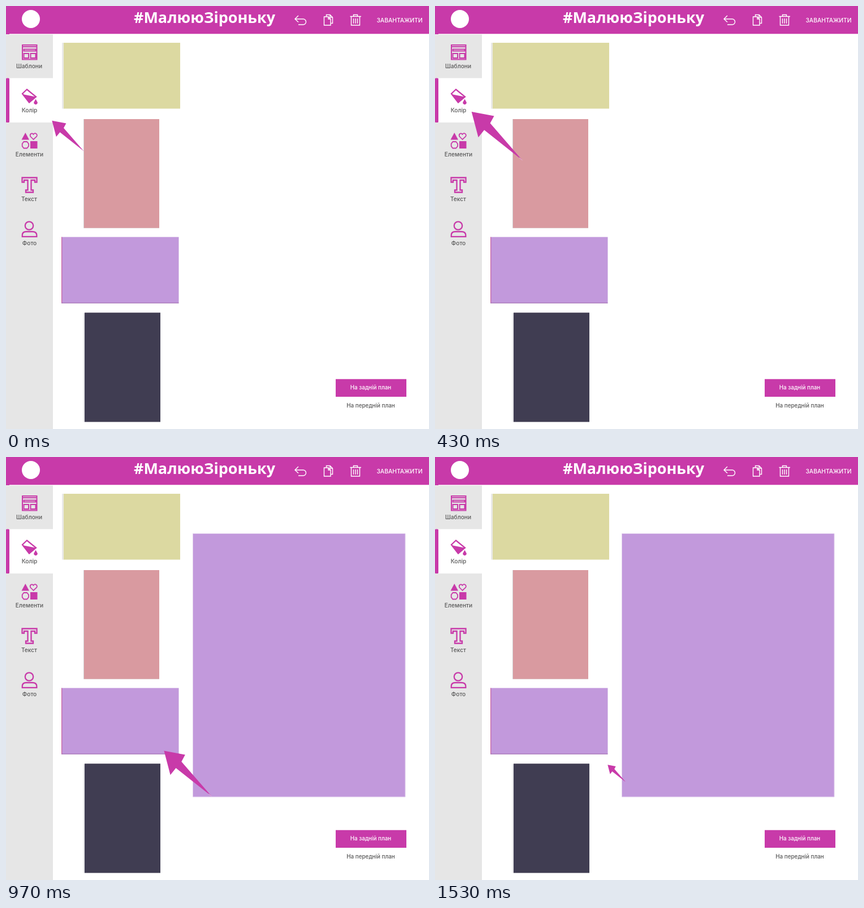
An HTML page for the animation above (1.61 s loop, 748 by 748 pixels).

```html
<!DOCTYPE html>
<html lang="uk">
<head>
<meta charset="utf-8">
<style>
  html, body { margin: 0; width: 100%; height: 100%; overflow: hidden; background: #fff; }
  svg { display: block; width: 100vw; height: 100vh; }
  text { font: 500 10.2px Inter, sans-serif; text-anchor: middle; fill: #585858; }
  .pink { fill: #c83aa9; }
  .icon { fill: none; stroke: #c83aa9; stroke-width: 2.3; }
  .tool { fill: none; stroke: #fff; stroke-width: 1.4; }
  .light { fill: #fff; }
  .title { font: 700 27px "Open Sans", "Noto Sans", sans-serif; }
  .small { font-size: 9.9px; }
</style>
</head>
<body>
<svg viewBox="0 0 748 748">
  <!-- header -->
  <path class="pink" d="M0 0H748V49.300H6V50H0Z"/>
  <circle class="light" cx="44" cy="23" r="16"/>
  <text class="light title" x="351" y="30">#МалююЗіроньку</text>
  <g class="tool">
    <path d="M517 17L511 23L517 28.500M511 23H525.500A5 5 0 0 1 525.500 33H517"/>
    <path d="M562.500 19H570L574 23V34H562.500ZM570 19V23H574M566.500 19V15.500H573L577.500 20V30.500H574M573 15.500V20H577.500"/>
    <path d="M608.500 18.500H628M614.500 18V15.500H621.500V18M610.500 19V34H625.500V19M614.500 22V31M618 22V31M621.500 22V31"/>
  </g>
  <text class="light" x="696" y="28.600" style="font-size:10.3px">ЗАВАНТАЖИТИ</text>

  <!-- sidebar -->
  <path fill="#e6e6e6" d="M0 50.500H83V748H0Z"/>
  <path fill="#fff" d="M3 127.500H83V206H3Z"/>
  <rect class="pink" y="127.500" width="6" height="78.500" rx="1.500"/>
  <g class="icon">
    <path d="M29 69H54.500V94.500H29ZM29 72H54.500M31.500 76.500H52.500V79.500H31.500ZM31.500 84H40V92H31.500ZM43.500 84H52.500V92H43.500Z" stroke-width="2"/>
    <path d="M37 147.500L29 155L41 170.500L53 160.500Z"/>
    <path d="M48.500 236L43.500 231C41 227 45.500 223 48.500 227C51.500 223 57 227 54 231Z" stroke-width="1.700"/>
    <path d="M31.500 240H37L40 243.500V248L37 251.500H31.500L28.700 248V243.500Z" stroke-width="1.800"/>
    <path d="M28.500 303.500H54.500V311.500H51V308H44.500V325.500H48V329.500H35V325.500H38.500V308H32V311.500H28.500Z"/>
    <circle cx="41" cy="388.500" r="7.200"/>
    <path d="M28.800 407.800V405Q29 399 36 399H46.500Q54 399 54.300 405V407.800Z"/>
  </g>
  <g class="pink">
    <path d="M29 156L52 160.500L41 171Z"/>
    <path d="M52.500 164.500L55 169A3.200 3.200 0 1 1 50 169Z"/>
    <path d="M34.300 224L41 236.500H27.500Z"/>
    <path d="M43 239H55.500V252H43Z"/>
  </g>
  <text x="41" y="109.500">Шаблони</text>
  <text x="41.500" y="188">Колір</text>
  <text x="41.500" y="266">Елементи</text>
  <text x="41" y="344.500">Текст</text>
  <text x="41.500" y="423">Фото</text>

  <!-- swatches -->
  <path fill="#e9e9e7" d="M99 65H103V181.500H99Z"/>
  <path fill="#dcd9a1" d="M102 65H308V181.500H102Z"/>
  <path fill="#d3cfd0" d="M137 200H271V392.700H137Z"/>
  <path fill="#d99aa0" d="M138 200H271V392.500H138Z"/>
  <path fill="#c299dc" d="M98 408.500H305.500V525.500H98Z"/>
  <path fill="#c9609f" d="M98 408.500H99.200V525.500H98Z"/>
  <path fill="#a877b8" d="M98 524.500H305.500V525.700H98Z"/>
  <path fill="#e6e6e8" d="M136.500 543H140V735.500H136.500Z"/>
  <path fill="#403d52" d="M139 542.300H273V735.500H139Z"/>

  <!-- buttons -->
  <path class="pink" d="M583 659.700H708V691H583Z"/>
  <text class="light small" x="645" y="678">На задній план</text>
  <text class="small" x="645" y="710">На передній план</text>

  <path id="canvas" fill="#c299dc" stroke="#e0ccec" d="M330.500 135.500H706V601H330.500Z"/>
  <g id="arrow">
    <path class="pink" d="M-45 -43L-5 -35.500L-12 -22.500L45 43L-22.500 -10.500L-33 2.500Z"/>
    <path fill="none" stroke="#e5b9dc" d="M39.500 38.500L45 43"/>
  </g>
</svg>
<script>
  const LOOP = 1610, STEP = 100 / 3, PERIOD = 360;
  const arrow = document.getElementById('arrow');
  const canvas = document.getElementById('canvas');

  // The arrow swells and shrinks in pulses, resting small outside [from, to].
  function pulse(t, from, to) {
    if (t < from || t > to) return 0;
    const swell = (1 - Math.cos((t - from) / PERIOD * 2 * Math.PI)) / 2;
    return swell ** 1.4;
  }

  function draw(now) {
    const time = now % LOOP;
    const t = Math.floor((time + 3.4) / STEP) * STEP;
    const filled = time >= 770;
    const scale = filled
      ? 0.36 + 0.61 * pulse(t, 810, 1530)
      : 0.39 + 0.625 * pulse(t, -90, 630);
    const place = filled ? '321.5 559.8' : '109.5 229.8';
    canvas.style.display = filled ? '' : 'none';
    arrow.setAttribute('transform', `translate(${place}) scale(${scale})`);
  }

  const start = performance.now();
  function tick() {
    draw(performance.now() - start);
    requestAnimationFrame(tick);
  }
  tick();
</script>
</body>
</html>
```
